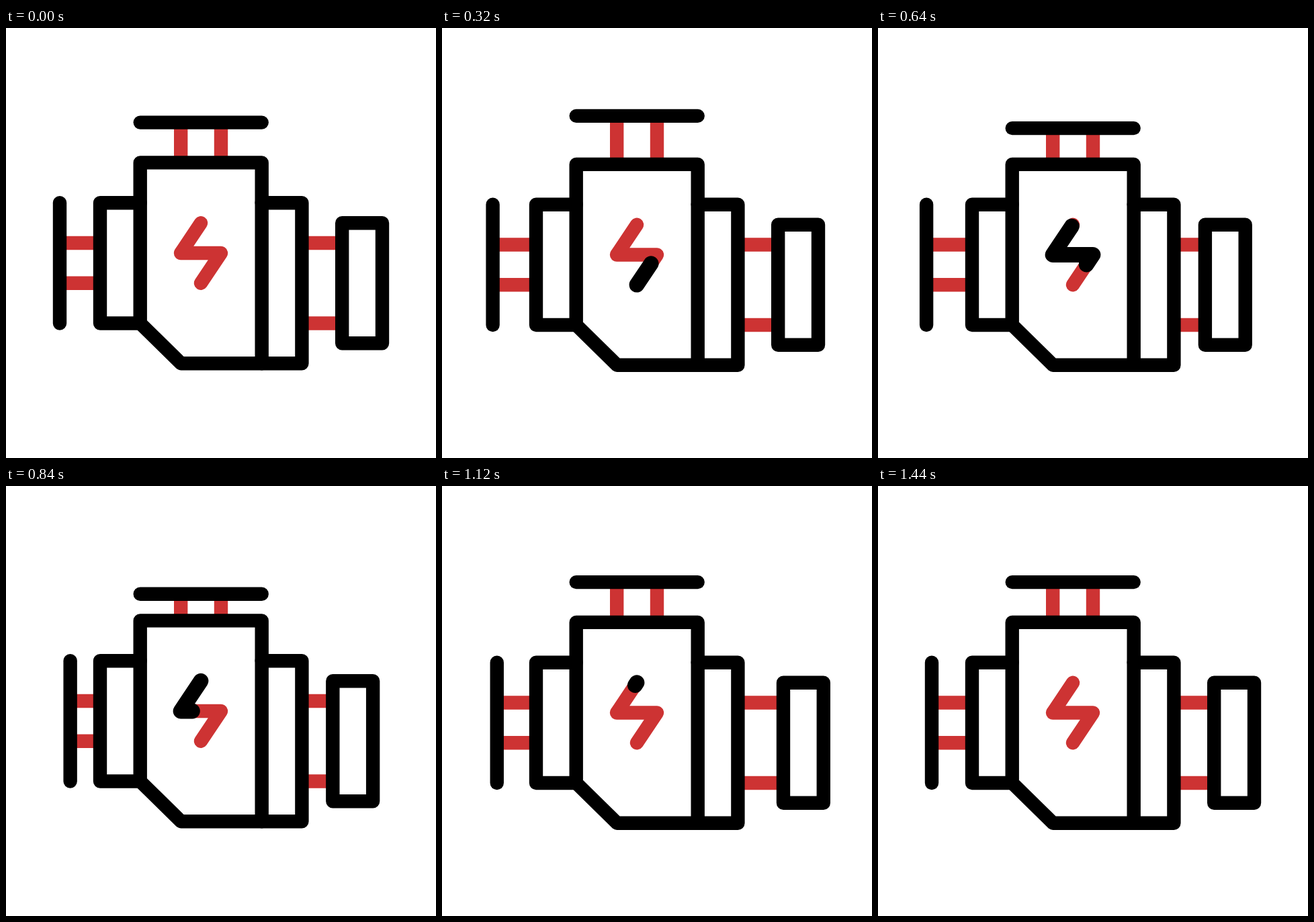
An HTML page that plays this animation: 640x640 px, repeating every 1.48 s.

```html
<!DOCTYPE html>
<html lang="en">
<head>
<meta charset="utf-8">
<title>Running engine</title>
<style>
  html, body { margin: 0; width: 100%; height: 100%; overflow: hidden; background: #fff; }
  svg { display: block; width: 100%; height: 100%; }
  path { fill: none; stroke: #000; stroke-width: 20.4; stroke-linejoin: round; stroke-linecap: round; }
  .red { stroke: #cd3333; }
  .rod { stroke-linecap: butt; }
  #spark { stroke-width: 22.8; }
</style>
</head>
<body>
<svg viewBox="0 0 640 640">
  <g id="engine">
    <path class="red rod" id="topRods"/>
    <path class="red rod" id="leftRods"/>
    <path class="red rod" id="rightRods"/>
    <path id="topBar" d="M199.7 140.6H380.7"/>
    <path id="leftBar" d="M80 260.2V439.5"/>
    <path id="rightBox" d="M500.2 290.2H560V469.2H500.2Z"/>
    <path d="M199.7 260.2H140V439.5H199.7M380.7 260.2H440.4V499.2H380.7"/>
    <path d="M199.7 200.4H380.7V499.2H260.5L199.7 439.5Z"/>
    <path class="red" d="M290 379.7L320 335H260L290 290.2"/>
    <path id="spark" pathLength="1" d="M290 379.7L320 335H260L290 290.2"/>
  </g>
</svg>
<script>
const STEP = 40, STEPS = 37;
const $ = id => document.getElementById(id);
const set = (id, name, value) => $(id).setAttribute(name, value);
const move = (id, x, y) => set(id, 'transform', `translate(${x} ${y})`);

// Keys are [step, value] pairs joined by an ease-in-out curve.
const TOP = [[0, 0], [11, -15], [20, 21], [28, 0]];
const LEFT = [[4, 0], [14, -12.5], [22, 16.9], [29.5, 0]];
const RIGHT = [[9, 0], [19, -17], [28, 7.8], [36, 0]];
const SPARK_HEAD = [[4, 0], [17, 1]];
const SPARK_TAIL = [[10, 0], [30, 1]];

function at(keys, step) {
  if (step <= keys[0][0]) return keys[0][1];
  for (let i = 1; i < keys.length; i++) {
    const [t0, v0] = keys[i - 1], [t1, v1] = keys[i];
    if (step < t1) {
      const s = (step - t0) / (t1 - t0);
      return v0 + (v1 - v0) * s * s * (3 - 2 * s);
    }
  }
  return keys[keys.length - 1][1];
}

function shake(step) {
  return step < 2 ? -1.25 * step : 2.5 * Math.cos(step * Math.PI / 2);
}

function draw() {
  const step = Math.floor(performance.now() / STEP) % STEPS;
  const top = at(TOP, step), left = at(LEFT, step), right = at(RIGHT, step);

  move('engine', 0, shake(step));
  move('topBar', 0, top);
  move('leftBar', left, 0);
  move('rightBox', right, 0);

  set('topRods', 'd', `M260.2 200V${140.6 + top}M320 200V${140.6 + top}`);
  set('leftRods', 'd', `M140 320H${80 + left}M140 379.7H${80 + left}`);
  set('rightRods', 'd', `M440 320H${500 + right}M440 439.5H${500 + right}`);

  const head = at(SPARK_HEAD, step), tail = at(SPARK_TAIL, step);
  set('spark', 'visibility', head > tail ? 'visible' : 'hidden');
  set('spark', 'stroke-dasharray', `${head - tail} 2`);
  set('spark', 'stroke-dashoffset', -tail);

  requestAnimationFrame(draw);
}
draw();
</script>
</body>
</html>
```
